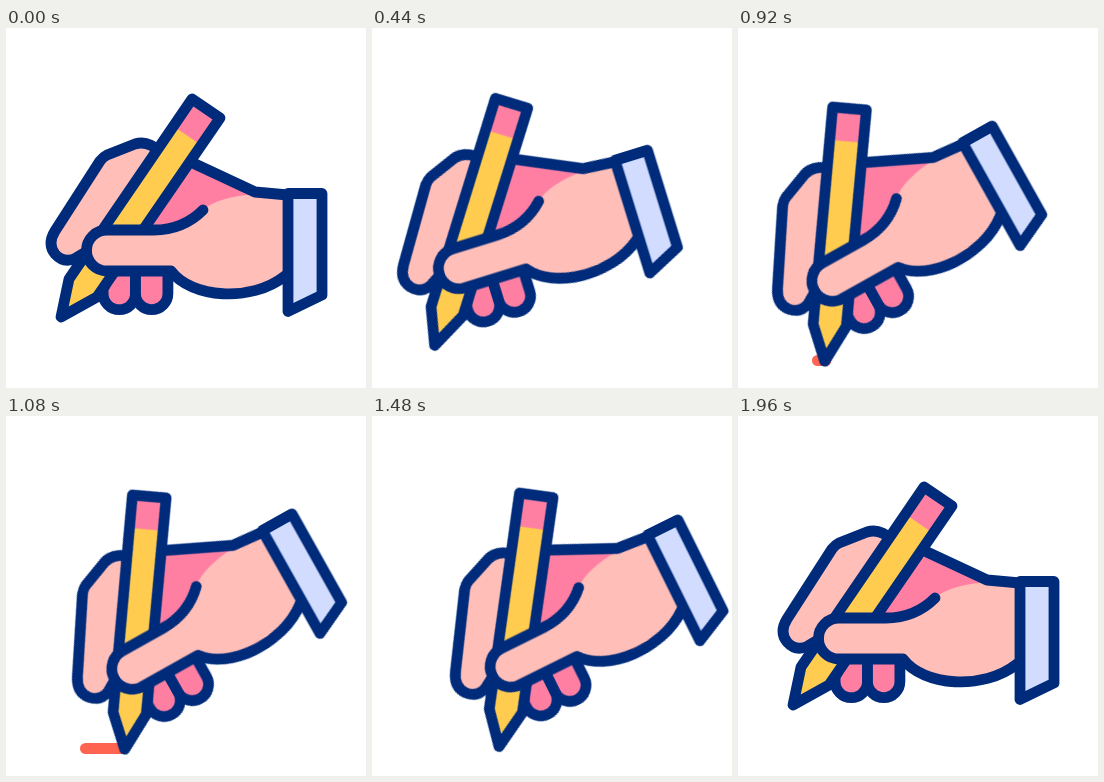
An HTML page that plays this animation: 360 by 360 pixels, repeating every 2000 ms.

```html
<!DOCTYPE html>
<html lang="en">
<head>
<meta charset="utf-8">
<title>Writing hand</title>
<style>
  :root {
    --ink: #002b7a;
    --skin: #ffbeb8;
    --pink: #ff7fa3;
    --yellow: #ffcc50;
  }
  html, body { margin: 0; width: 100%; height: 100%; overflow: hidden; background: #fff; }
  svg { display: block; width: 100%; height: 100%; }

  .ink { stroke: var(--ink); stroke-width: 10.8; stroke-linecap: round; stroke-linejoin: round; }
  .skin { fill: var(--skin); }
  .pink { fill: var(--pink); }
  .yellow { fill: var(--yellow); }
  .cuff { fill: #d2dcff; }
  .open { fill: none; }

  #slide { animation: slide 2s cubic-bezier(.33, 0, .67, 1) infinite; }
  #hand { transform-origin: 180px 180px; animation: tilt 2s cubic-bezier(.33, 0, .67, 1) infinite; }
  #line {
    fill: none; stroke: #ff6450; stroke-width: 11; stroke-linecap: round;
    stroke-dasharray: 1 2;
    animation: draw 2s linear infinite, show 2s linear infinite;
  }

  /* The way back passes a midpoint, so its easing is split into two halves. */
  @keyframes slide {
    0%, 8% { translate: 0 0; }
    36% { translate: -60px 0; }
    64% { translate: 16.7px 0; animation-timing-function: cubic-bezier(.33, 0, .665, .5); }
    80.25% { translate: 3.3px 0; animation-timing-function: cubic-bezier(.335, .5, .67, 1); }
    96.5%, 100% { translate: 0 0; }
  }
  @keyframes tilt {
    0%, 8% { translate: 0 0; rotate: 0deg; }
    36% { translate: 0 -7.3px; rotate: -34.2deg; }
    50% { translate: 0 -1.8px; rotate: -28deg; }
    64% { translate: 0 -7.3px; rotate: -34.2deg; animation-timing-function: cubic-bezier(.33, 0, .665, .5); }
    80.25% { translate: 0 3px; rotate: -17.1deg; animation-timing-function: cubic-bezier(.335, .5, .67, 1); }
    96.5%, 100% { translate: 0 0; rotate: 0deg; }
  }
  @keyframes draw {
    0% { stroke-dashoffset: 1; }
    36% { stroke-dashoffset: 1; animation-timing-function: cubic-bezier(.5, 0, .8, .5); }
    50% { stroke-dashoffset: .75; animation-timing-function: cubic-bezier(.33, .33, .67, 1); }
    64%, 100% { stroke-dashoffset: 0; }
  }
  @keyframes show {
    0%, 39.9% { opacity: 0; }
    40%, 64% { opacity: 1; }
    74%, 100% { opacity: 0; }
  }
</style>
</head>
<body>
<svg viewBox="0 0 360 360">
  <path id="line" pathLength="1" d="M79.5 332.5H153"/>
  <g id="slide">
    <g id="hand">
      <!-- index finger -->
      <path class="skin ink" d="M154 124Q142 112 129 116L101 127Q97 129 94 133L49 203Q41 216 49 226Q58 236 70 230L95 215L150 140Z"/>
      <!-- palm -->
      <path class="pink" d="M188 136L252 165L270 200L140 205Z"/>
      <!-- curled fingers -->
      <path class="pink ink" d="M129.5 240V265.5a16.2 16.2 0 0 1-32.4 0V261L108 240Z"/>
      <path class="pink ink" d="M129.5 240V265.5a16.2 16.2 0 0 0 32.4 0V240Z"/>
      <!-- pencil -->
      <path class="yellow" d="M186 71L214 90L91 269L55 289L63 251Z"/>
      <path class="pink" d="M186 71L214 90L195.4 117.3L167.4 98.3Z"/>
      <path class="ink open" d="M186 71L214 90L91 269L55 289L63 251Z"/>
      <!-- hand and thumb -->
      <path class="skin" d="M282 167L250 166.5Q213 168 197 182C185 194 170 202 148 202H101a20.5 20.5 0 0 0 0 41H165C185 270 245 275 282 247Z"/>
      <path class="ink open" d="M197 182C185 194 170 202 148 202H101a20.5 20.5 0 0 0 0 41H165C185 270 245 275 279 248"/>
      <path class="ink open" d="M189 136L249 164L282 167"/>
      <!-- cuff -->
      <path class="cuff ink" d="M282 165.5H316V267L282 283.5Z"/>
    </g>
  </g>
</svg>
</body>
</html>
```
